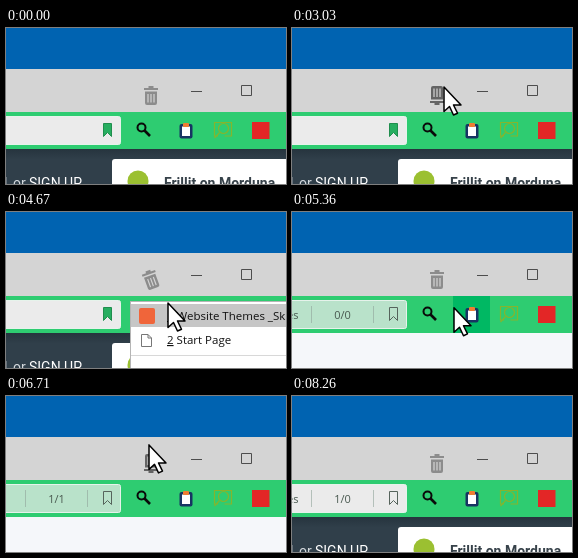
Recreate the animation shown at these times as an HTML page. Size 280x156 px, loop 8.8 s.

```html
<!DOCTYPE html>
<html lang="en">
<head>
<meta charset="utf-8">
<title>Browser trash menu</title>
<style>
  html, body { margin: 0; width: 100%; height: 100%; overflow: hidden; }
  svg { display: block; width: 100%; height: 100%; }
  .site { font-family: Roboto, sans-serif; font-size: 14px; }
  .ui { font-family: "Open Sans", "Noto Sans", sans-serif; font-size: 11.5px; fill: #111; }
  .status { font-size: 11px; fill: #48584f; }
  .line { fill: none; }
</style>
</head>
<body>
<svg viewBox="0 0 280 156" preserveAspectRatio="none">
  <defs>
    <linearGradient id="shade" x1="0" y1="0" x2="0" y2="1">
      <stop offset="0" stop-color="#26343e"/>
      <stop offset=".3" stop-color="#303f4a"/>
    </linearGradient>
  </defs>

  <rect width="280" height="41" fill="#0063b1"/>
  <rect y="41" width="280" height="43" fill="#d4d4d4"/>
  <rect y="84" width="280" height="37" fill="#2ecc71"/>
  <rect y="121" width="280" height="35" fill="#f5f7fa"/>

  <g id="site" class="site">
    <rect y="121" width="280" height="35" fill="url(#shade)"/>
    <text x="-2" y="160" fill="#d5dade">l</text>
    <text x="7" y="160" fill="#d5dade">or</text>
    <text x="23" y="160" fill="#fff">SIGN UP</text>
    <rect x="106" y="131" width="180" height="40" rx="3" fill="#fff"/>
    <circle cx="132" cy="153" r="10.5" fill="#9bc031"/>
    <text x="158" y="160" fill="#37424a" font-weight="700">Frillit on Morduna</text>
  </g>

  <!-- window buttons -->
  <path class="line" d="M185 63.5h11M235.5 57.5h10v10h-10z" stroke="#4d4d4d"/>

  <g id="trash">
    <path d="M-7-7.5h4.5v-2h5v2h4.500v2h-14zM-6-4h12v11.500q0 2-2 2h-8q-2 0-2-2z"/>
    <path class="line" d="M-3-1.500v8.500M0-1.500v8.500M3-1.500v8.500" stroke="#d4d4d4" stroke-width="1.200"/>
  </g>

  <!-- address bar -->
  <rect id="bar" x="-5" y="88.500" width="119.500" height="28" rx="2" stroke="#e6f3eb"/>
  <g id="status" class="ui status">
    <path class="line" d="M19.500 94v17M81.500 94v17" stroke="#8fa499" stroke-opacity=".6"/>
    <text id="tail" x="-5" y="107">es</text>
    <text id="count" x="50.500" y="107" text-anchor="middle"></text>
  </g>
  <path id="bookmark" d="M97.500 95.500h8v13l-4-4-4 4z"/>

  <!-- toolbar -->
  <rect id="hover" x="161" y="84" width="37" height="37" fill="#00b863"/>
  <g class="line" stroke="#0a0a0a">
    <circle cx="135.500" cy="99.500" r="4" stroke-width="2"/>
    <path d="M138.500 102.500l5.500 5.500" stroke-width="2.600"/>
  </g>
  <rect x="173.500" y="96" width="13" height="14.500" rx="2" fill="#173463"/>
  <rect x="176" y="98.500" width="8" height="9.500" fill="#fff"/>
  <rect x="177" y="95" width="6" height="4" rx="1" fill="#ef7d32"/>
  <g class="line" stroke="#84b52e" stroke-width="1.200">
    <path d="M212 108h-3.500v-13.500h17v13.500h-7M213.500 104.500l-5 5.500"/>
    <circle cx="217.500" cy="100.500" r="5"/>
  </g>
  <rect x="246" y="94" width="17.500" height="17" fill="#e32626"/>

  <g id="menu" class="ui">
    <rect x="124.500" y="89.500" width="170" height="80" fill="#fff" stroke="#b5b5b5"/>
    <rect id="row" x="125" y="92" width="155" height="23" fill="#c6c6c6"/>
    <rect x="133" y="96" width="16" height="16" rx="2" fill="#f0653a"/>
    <text x="161" y="108"><tspan text-decoration="underline">1</tspan> Website Themes _Skins</text>
    <path d="M135.500 122.500h6.500l3.500 3.500v8.500h-10zM142 122.500v3.500h3.500" fill="#fff" stroke="#777"/>
    <text x="161" y="132"><tspan text-decoration="underline">2</tspan> Start Page</text>
    <path class="line" d="M125 143.500h155" stroke="#d8d8d8"/>
  </g>

  <path id="cursor" d="M0 0v24.500l5.500-5 4 8.500 4-1.800-4-8.200h7.500z" fill="#fff" stroke="#000" stroke-width="1.500" stroke-linejoin="round"/>
</svg>

<script>
const LOOP = 8800;
const el = Object.fromEntries([...document.querySelectorAll('[id]')].map(e => [e.id, e]));

// time, x, y of the pointer tip
const pointerPath = [
  [340, 148, -30], [1140, 151, 28], [1590, 152, 50], [2090, 152, 54],
  [3030, 152, 59], [3630, 153, 61], [4400, 161, 89], [4670, 162, 91],
  [5550, 162, 97], [6010, 162, 97], [6710, 143, 49], [6810, 143, 39],
  [7710, 131, -30]
];
// time, turn in degrees, darkness of the bin
const binPath = [
  [1500, 0, 0], [1700, -8, 1], [2500, -180, 1], [3850, -180, 1],
  [4300, -80, .4], [4670, -20, 0], [4950, 0, 0],
  [6150, 0, 0], [6650, -180, 1], [6850, -180, 1], [7650, 0, 0]
];

const clamp = v => Math.max(0, Math.min(1, v));
const between = (t, a, b) => t >= a && t < b;
const show = (node, on) => node.setAttribute('visibility', on ? 'visible' : 'hidden');

function sample(path, t) {
  const next = path.findIndex(k => k[0] > t);
  if (next === 0) return path[0].slice(1);
  if (next < 0) return path[path.length - 1].slice(1);
  const a = path[next - 1], b = path[next];
  const p = (t - a[0]) / (b[0] - a[0]);
  return a.slice(1).map((v, i) => v + (b[i + 1] - v) * p);
}

function render(t) {
  const [x, y] = sample(pointerPath, t);
  const [turn, dark] = sample(binPath, t);
  const loading = between(t, 4900, 7810);
  const hasStatus = t >= 4900;

  el.cursor.setAttribute('transform', `translate(${x} ${y})`);
  el.trash.setAttribute('transform', `translate(145 67.500) rotate(${turn})`);
  const grey = Math.round(140 - 40 * dark);
  el.trash.setAttribute('fill', `rgb(${grey},${grey},${grey})`);

  show(el.site, !loading);
  show(el.hover, between(t, 4900, 6100) && x > 160);
  el.bar.setAttribute('fill', loading ? '#b9e2ca' : '#ebebeb');
  show(el.status, hasStatus);
  show(el.tail, between(t, 4900, 5810) || t >= 8260);
  el.count.textContent = t < 5810 ? '0/0' : t < 8260 ? '1/1' : '1/0';
  el.bookmark.setAttribute('fill', hasStatus ? 'none' : '#27ae60');
  el.bookmark.setAttribute('stroke', hasStatus ? '#56645c' : '#208e4e');

  el.menu.setAttribute('opacity', t < 4770 ? clamp((t - 3130) / 250) : 0);
  show(el.row, t >= 4400);
}

function tick(now) {
  render(now % LOOP);
  requestAnimationFrame(tick);
}
render(0);
requestAnimationFrame(tick);
</script>
</body>
</html>
```
